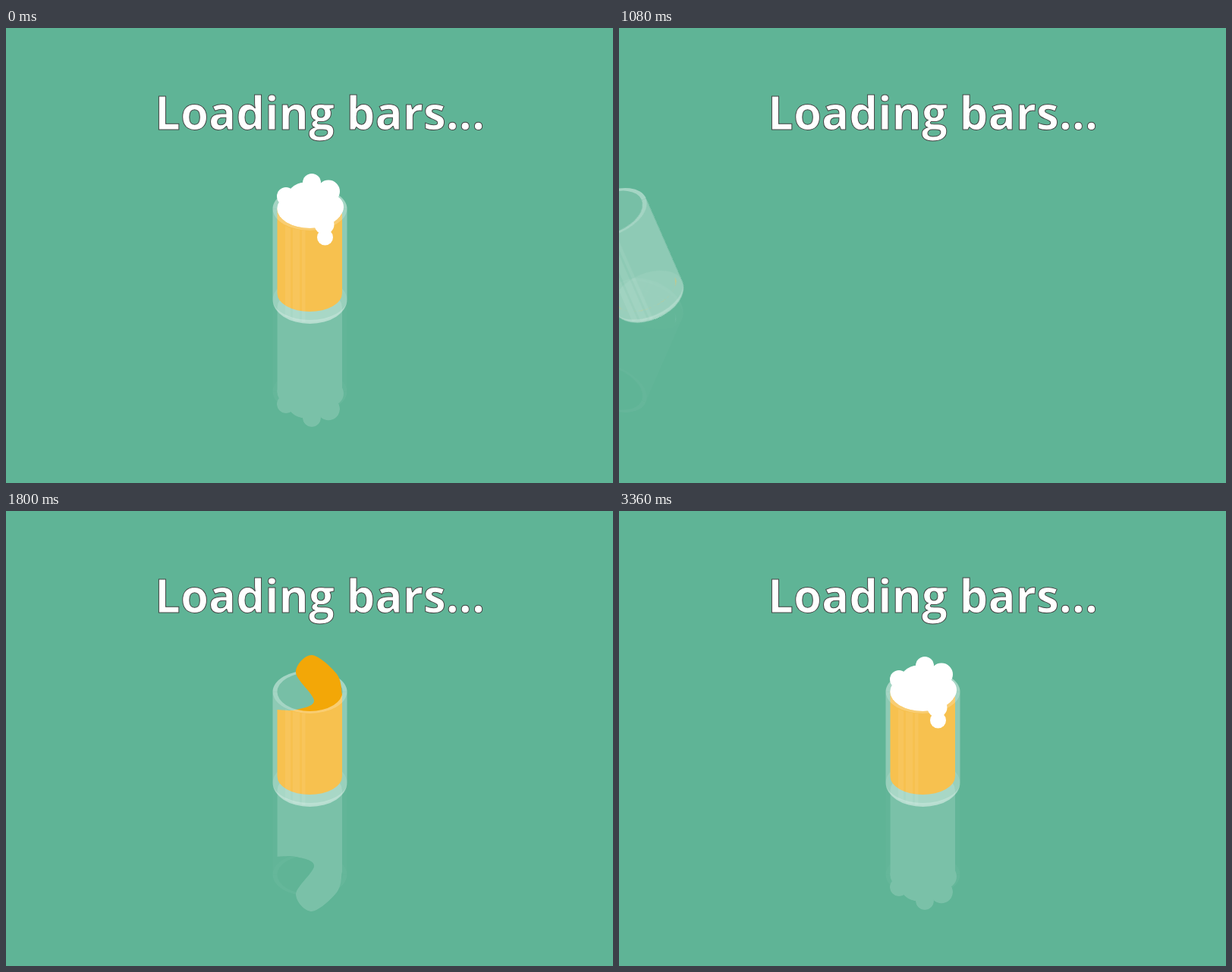
An HTML page that plays this animation: 800x600 px, repeating every 3520 ms.

```html
<!DOCTYPE html>
<html lang="en">
<head>
<meta charset="utf-8">
<title>Loading bars</title>
<style>
  html, body { margin: 0; width: 100%; height: 100%; overflow: hidden; background: #5fb496; }
  svg { display: block; width: 800px; height: 600px; }
  text { font: 700 60px "Open Sans", sans-serif; fill: #fff; stroke: #444; stroke-width: 1px; }
  .white { fill: #fff; }
  .beer { fill: #f3a707; }
</style>
</head>
<body>
<svg viewBox="0 0 800 600">
  <!-- White silhouette; clear glass mirrors more faintly than its contents -->
  <filter id="ghost" color-interpolation-filters="sRGB">
    <feComponentTransfer>
      <feFuncR type="linear" slope="0" intercept="1"/>
      <feFuncG type="linear" slope="0" intercept="1"/>
      <feFuncB type="linear" slope="0" intercept="1"/>
      <feFuncA type="gamma" amplitude=".17" exponent="1.7"/>
    </feComponentTransfer>
  </filter>
  <rect width="800" height="600" fill="#5fb496"/>
  <g filter="url(#ghost)"><use href="#scene" transform="matrix(1 0 0 -1 0 718)"/></g>
  <text x="196" y="133.7">Loading bars...</text>
  <g id="scene">
    <g id="cup">
      <g class="white">
        <ellipse cx="400.5" cy="238.5" rx="43" ry="25.5" opacity=".15"/>
        <path d="M351.5 238.5A49 28.5 0 0 1 449.5 238.5H443.5A43 25.5 0 0 0 357.5 238.5Z" opacity=".43"/>
        <ellipse cx="400.5" cy="358" rx="49" ry="29.5" opacity=".08"/>
      </g>
      <ellipse id="drop" class="beer" cx="400" rx="20"/>
      <path id="liquid" class="beer"/>
      <g class="white">
        <path d="M351.5 238.5A49 28.5 0 0 0 449.5 238.5H443.5A43 25.5 0 0 1 357.5 238.5Z" opacity=".43"/>
        <path d="M351.5 238.5A49 28.5 0 0 0 449.5 238.5V358A49 32 0 0 1 351.5 358Z" opacity=".29"/>
        <path d="M351.5 358A49 32 0 0 0 449.5 358A49 27 0 0 1 351.5 358Z" opacity=".22"/>
        <path d="M368 261V381H375V264Z M378 265V386H387V266Z M390 267V388H394.5V267Z" opacity=".07"/>
      </g>
      <g id="foam" class="white"></g>
    </g>
    <g fill="none" stroke="#fff">
      <path id="big" d="M-6.5 0H6.5M0 -6.5V6.5" stroke-width="2"/>
      <path id="small" d="M-3 0H3M0 -3V3" stroke-width="1.4"/>
    </g>
  </g>
</svg>
<script>
const LOOP = 3520, STEP = 40;
const $ = id => document.getElementById(id);
const mix = (a, b, p) => a + (b - a) * p;
const span = (t, start, length) => Math.min(1, Math.max(0, (t - start) / length));
const quadIn = p => p * p;
const quadOut = p => 1 - (1 - p) ** 2;
const cubicOut = p => 1 - (1 - p) ** 3;
const inOut = p => p < .5 ? 2 * p * p : 1 - 2 * (1 - p) ** 2;
const backOut = p => 1 + 2.7 * (p - 1) ** 3 + 1.7 * (p - 1) ** 2;

// Foam bubbles (x, y, rx, ry) swell one after another, the drip last
const bubbles = [
  [400.5, 238.5, 43, 25.5], [373, 238, 15.5], [429, 236, 16],
  [394, 229, 25.5], [369, 222, 12], [425, 215.5, 15],
  [403, 204, 12], [419.5, 259, 13], [420.5, 276, 10.5]
].map(([cx, cy, rx, ry = rx], i) => {
  const node = document.createElementNS("http://www.w3.org/2000/svg", "ellipse");
  node.setAttribute("cx", cx);
  node.setAttribute("cy", cy);
  $("foam").append(node);
  return { node, rx, ry, start: 1960 + 7.5 * i * i };
});

// Liquid surfaces, each as a few points from the left wall to the right
const arc = (cy, ry) => Array.from({ length: 7 }, (_, i) => {
  const a = Math.PI * i / 6;
  return [400.25 - 42.75 * Math.cos(a), cy + ry * Math.sin(a)];
});
const empty = arc(350, 24);
const full = arc(238.5, -25.5);
const splash = [[357.5, 262], [382, 262], [406, 250], [382, 213], [403, 190], [436, 215], [443, 242]];

function smooth(pts) {
  const at = i => pts[Math.min(pts.length - 1, Math.max(0, i))];
  const handle = (i, sign) => at(i).map((v, k) => v + sign * (at(i + 1)[k] - at(i - 1)[k]) / 6);
  return "M" + pts[0] + pts.slice(1).map((p, i) => `C${handle(i, 1)} ${handle(i + 1, -1)} ${p}`).join("");
}

function surface(t) {
  const rising = t < 1800;
  const p = rising ? quadOut(span(t, 1520, 280)) : backOut(span(t, 1800, 200));
  const [from, to] = rising ? [empty, splash] : [splash, full];
  const pts = from.map((a, i) => a.map((v, k) => mix(v, to[i][k], p)));
  return smooth(pts) + "L443 350A42.75 24 0 0 1 357.5 350Z";
}

function sparkle(id, x, y, size) {
  $(id).setAttribute("transform", `translate(${x} ${y}) scale(${size})`);
}

function draw(now) {
  const t = Math.floor(now % LOOP / STEP) * STEP;
  const leaving = t < 800;
  const out = quadIn(span(t, 360, 400));
  const x = leaving ? 500 * out : -500 * (1 - inOut(span(t, 948, 390)));
  const lean = leaving ? 20 * out : 30 * (1 - inOut(span(t, 940, 430)));
  $("cup").setAttribute("transform", `translate(${x} 0) rotate(${-lean} 400.5 300)`);

  // The glass that leaves was filled one loop earlier
  const age = leaving ? t + LOOP : t;
  const top = -160 + .0101 * Math.max(0, age - 1300) ** 2;
  const bottom = Math.min(top + 120, 372);
  $("drop").setAttribute("cy", (top + bottom) / 2);
  $("drop").setAttribute("ry", Math.max(0, (bottom - top) / 2));
  $("liquid").setAttribute("d", surface(age));

  for (const b of bubbles) {
    const size = Math.max(0, backOut(span(age, b.start, 460)));
    b.node.setAttribute("rx", b.rx * size);
    b.node.setAttribute("ry", b.ry * size);
  }

  const size = span(t, 2360, 120) * (1 - span(t, 2760, 580));
  sparkle("big", 396, mix(215, 132, cubicOut(span(t, 2360, 700))), size);
  sparkle("small", 403, mix(215, 154, cubicOut(span(t, 2400, 700))), size);
}

const began = performance.now();
function tick() {
  draw(performance.now() - began);
  requestAnimationFrame(tick);
}
tick();
</script>
</body>
</html>
```
